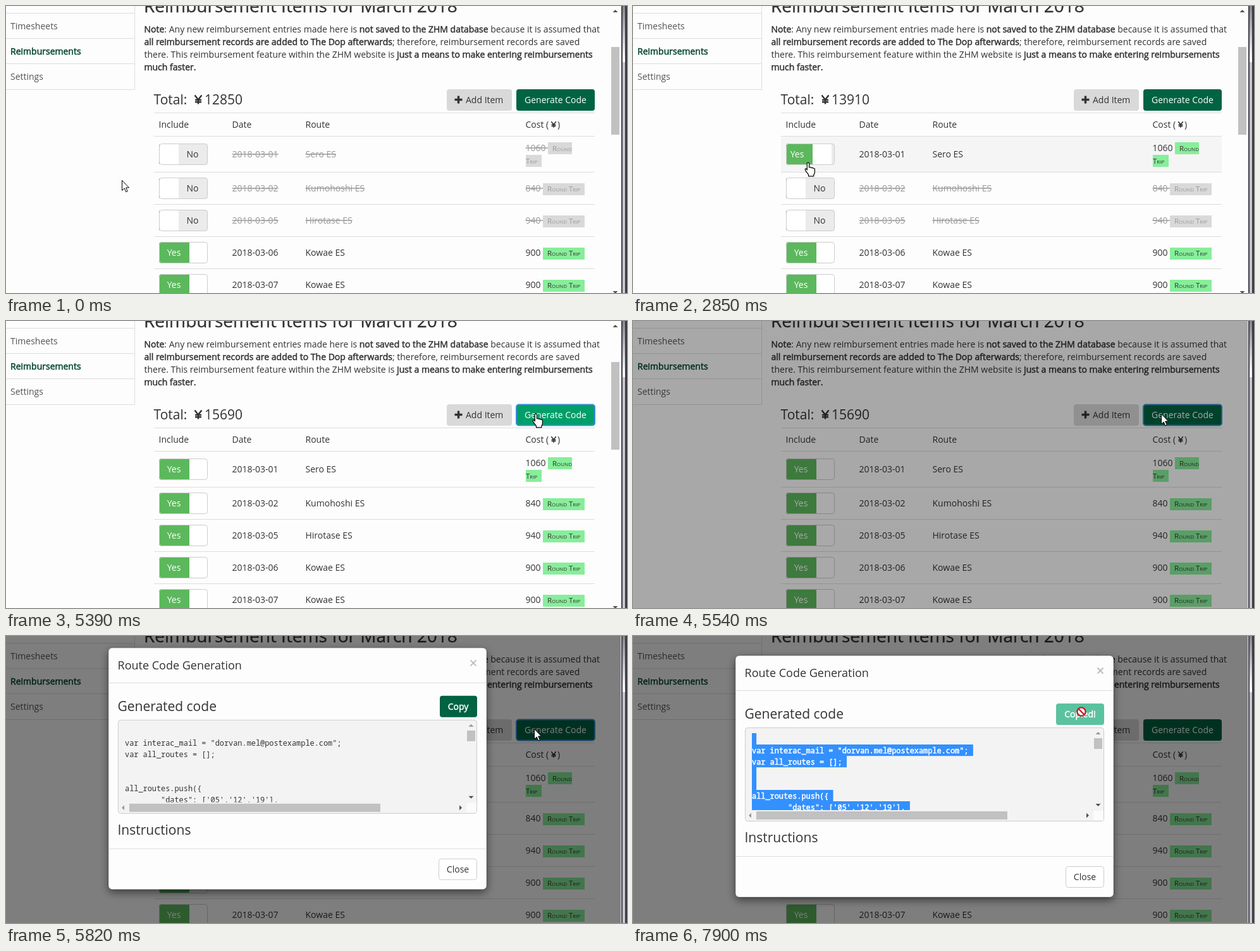
Write an HTML page that moves like this. It is 982 by 455 pixels and loops after 8000 ms.

```html
<!DOCTYPE html>
<html lang="en">
<head>
<meta charset="utf-8">
<title>Reimbursements</title>
<style>
  html, body { margin: 0; height: 100%; overflow: hidden; background: #fdfdfd; }
  svg { display: block; width: 982px; height: 455px; color: #333; }
  text { font: 14px "Open Sans", sans-serif; fill: currentColor; white-space: pre; }
  .bold { stroke: currentColor; stroke-width: .5px; }
  .head { font-size: 28px; stroke: currentColor; stroke-width: .35px; }
  .sub { font-size: 21px; }
  .badge { font-size: 11.4px; font-variant: small-caps; }
  .code { font: 11.9px "Noto Sans Mono", monospace; }
  .mid { text-anchor: middle; }
  .off { color: #999; }
  .off .strike { text-decoration: line-through; }
  .line { stroke: #ddd; }
  .tag { fill: #87ee9a; }
  .off .tag { fill: #d9d9d9; }
</style>
</head>
<body>
<svg id="stage" viewBox="0 0 982 455"></svg>
<script>
const LOOP = 8000;
const GREEN = '#006341', HOVER = '#009f69';
const CLICKS = [2560, 3400, 4280];
const OPEN = 5440, COPIED = 7000, BLOCKED = 7470;

const rows = [
  { y: 235, top: 207, bottom: 263, date: '2018-03-01', route: 'Sero ES', cost: 1060 },
  { y: 289, top: 264, bottom: 314, date: '2018-03-02', route: 'Kumohoshi ES', cost: 840 },
  { y: 340, top: 315, bottom: 365, date: '2018-03-05', route: 'Hirotase ES', cost: 940 },
  { y: 391, top: 366, bottom: 416, date: '2018-03-06', route: 'Kowae ES', cost: 900 },
  { y: 442, top: 417, bottom: 467, date: '2018-03-07', route: 'Kowae ES', cost: 900 },
];

// Pointer hot spot: [ms, x, y]
const pointerPath = [
  [0, 183, 276], [270, 183, 276], [410, 270, 334], [550, 278, 320], [860, 278, 320],
  [1140, 276, 218], [1450, 276, 218], [1730, 275, 220], [2020, 276, 220], [2300, 279, 270],
  [2560, 277, 248], [3000, 277, 248], [3130, 280, 280], [3850, 280, 280], [4000, 280, 332],
  [4800, 280, 332], [5230, 838, 147], [5390, 838, 147], [5540, 835, 147], [5900, 835, 147],
  [6370, 712, 113], [6500, 711, 115], [6770, 709, 119], [LOOP, 709, 119],
];

const text = (x, y, s, cls = '', extra = '') =>
  `<text x="${x}" y="${y}" class="${cls}" ${extra}>${s}</text>`;
const rect = (x, y, w, h, fill, extra = '') =>
  `<rect x="${x}" y="${y}" width="${w}" height="${h}" fill="${fill}" ${extra}/>`;
const hline = (x1, x2, y) => `<path class="line" d="M${x1} ${y + .5}H${x2}"/>`;
const bold = s => `<tspan class="bold">${s}</tspan>`;
const yen = (x, y, k) => `<path transform="translate(${x} ${y}) scale(${k})" fill="none"
  stroke="#333" stroke-width="2.4" d="M-5.5-7L0 0L5.5-7M0 0V7M-5 .5H5M-5 3.7H5"/>`;
const arrow = (x, y, dx, dy, fill = '#505050') => {
  const [px, py] = [dy, dx];
  return `<path fill="${fill}" d="M${x + dx * 3} ${y + dy * 3}L${x + px * 4 - dx} ${y + py * 4 - dy}L${x - px * 4 - dx} ${y - py * 4 - dy}z"/>`;
};

function sidebar() {
  return [11, 51, 91, 132].map(y => hline(0, 204, y)).join('') +
    '<path class="line" d="M203.5 0V132"/><g color="#555">' +
    text(7, 37, 'Timesheets') + text(7, 117, 'Settings') + '</g>' +
    text(7, 77, 'Reimbursements', 'bold', 'color="#00452d"');
}

function intro() {
  return text(218, 10, 'Reimbursement Items for March 2018', 'head') +
    text(218.5, 42, bold('Note') + ': Any new reimbursement entries made here is ' +
      bold('not saved to the ZHM database') + ' because it is assumed that') +
    text(218.5, 62, bold('all reimbursement records are added to The Dop afterwards') +
      '; therefore, reimbursement records are saved') +
    text(218.5, 82, 'there. This reimbursement feature within the ZHM website is ' +
      bold('just a means to make entering reimbursements')) +
    text(218.5, 102, 'much faster.', 'bold');
}

function toolbar() {
  return text(233.5, 156, 'Total:', 'sub') + yen(304, 148.5, 1) +
    text(314, 156, '', 'sub', 'id="total"') +
    rect(697, 132, 103, 34, '#d9d9d9', 'rx="4"') +
    '<path stroke="#333" stroke-width="3.4" d="M709.5 148.5h12M715.5 142.5v12"/>' +
    text(727, 154, 'Add Item') +
    rect(807, 132, 124, 34, GREEN, 'rx="4" id="generate"') +
    text(869, 154, 'Generate Code', 'mid', 'color="#fff"') +
    rect(807, 132.5, 124, 33, 'none', 'rx="4" stroke="#3d8fd6" stroke-width="2" id="ring"');
}

function tableRow({ y, top, bottom, date, route, cost }, i) {
  const toggle = `<g transform="translate(242 ${y - 17})" color="#333"><g clip-path="url(#pill)">
    ${rect(0, 0, 77, 34, '#fff')}<g id="slide${i}">${rect(0, 0, 48, 34, '#5cb85c')}
    ${text(23.5, 22, 'Yes', 'mid', 'color="#fff"')}${rect(78, 0, 48, 34, '#ebebeb')}
    ${text(100, 22, 'No', 'mid')}</g></g>${rect(.5, .5, 76, 33, 'none', 'rx="4" stroke="#ccc"')}</g>`;
  const price = i === 0
    ? text(821.5, 230, '1060 ', 'strike') + rect(857, 216, 38, 19, '', 'class="tag"') +
      rect(822, 236, 25, 19, '', 'class="tag"') +
      text(864, 230, 'Round', 'badge') + text(822, 250, 'Trip', 'badge')
    : text(821.5, y + 5, cost + ' ', 'strike') + rect(849, y - 8, 66, 19, '', 'class="tag"') +
      text(856, y + 5, 'Round Trip', 'badge');
  return rect(234, top, 697, bottom - top, '#f5f5f5', `id="hover${i}"`) +
    `<g id="row${i}">${toggle}${text(357.5, y + 5, date, 'strike')}` +
    `${text(473.5, y + 5, route, 'strike')}${price}</g>` + hline(234, 931, bottom);
}

function table() {
  return hline(234, 931, 169) + hline(234, 931, 206) +
    text(241.5, 193, 'Include') + text(357.5, 193, 'Date') + text(473.5, 193, 'Route') +
    text(821.5, 193, 'Cost (') + yen(866, 188, .68) + text(872, 193, ')') +
    rows.map(tableRow).join('');
}

function windowEdge() {
  return '<g id="scrollbar">' + rect(957, 65, 13, 139, '#c1c1c1') +
    arrow(963.5, 9, 0, -1) + arrow(963.5, 453, 0, 1) + '</g>';
}

function frameEdge() {
  return rect(972, 0, 1, 455, '#e4e4e6') + rect(973, 0, 2, 455, '#46434e') +
    rect(975, 0, 4, 89, 'url(#sheen)') + rect(975, 89, 4, 366, '#c6c5cb') +
    rect(979, 0, 3, 455, '#3c3945');
}

function codeBlock() {
  const lines = ['', 'var interac_mail = "dorvan.mel@postexample.com";', 'var all_routes = [];',
    '', '', 'all_routes.push({', '        "dates": [\'05\',\'12\',\'19\'],'];
  const marks = lines.map((s, i) =>
    rect(188, 154 + 18 * i, (s.length + 1) * 7.14, 18.2, '#3390ff')).join('');
  return rect(177.5, 145.5, 567, 148, '#f3f3f3', 'rx="4" stroke="#ccc"') +
    `<g clip-path="url(#codeView)"><g id="marks">${marks}</g><g id="code">` +
    lines.map((s, i) => text(188, 168 + 18 * i, s, 'code')).join('') + '</g></g>' +
    rect(728, 277, 16, 15, '#fbfbfb') + rect(729, 162, 13, 17, '#c1c1c1') +
    rect(195, 278, 397, 13, '#c1c1c1') +
    arrow(735.5, 155, 0, -1, '#999') + arrow(735.5, 267, 0, 1) +
    arrow(186, 284.5, -1, 0, '#999') + arrow(718, 284.5, 1, 0);
}

function modal() {
  return '<g id="modal">' +
    rect(162, 31, 598, 383, '#fdfdfd', 'rx="6" stroke="#000" stroke-opacity=".25" filter="url(#shadow)"') +
    text(176.5, 65, 'Route Code Generation', '', 'style="font-size:18px"') +
    '<path stroke="#bbb" stroke-width="1.8" d="M734.5 50.5l9 9m0-9l-9 9"/>' + hline(162, 760, 86) +
    text(176.5, 131, 'Generated code', 'sub') +
    rect(686, 107, 59, 34, GREEN, 'rx="4" id="copy"') +
    text(715, 129, 'Copy', 'mid bold', 'color="#fff" id="copyLabel"') +
    codeBlock() + text(176.5, 327, 'Instructions', 'sub') + hline(162, 760, 349) +
    rect(684.5, 365.5, 60, 33, '#fff', 'rx="4" stroke="#ccc"') + text(714.5, 387, 'Close', 'mid') + '</g>';
}

const pointers = `<g id="pointer" stroke-linejoin="round">
  <path id="arrow" fill="#fff" stroke="#000" d="M.5.5V16.5L4.2 13L6.8 18.8L9.2 17.7L6.7 12H11.5z"/>
  <path id="hand" fill="#fff" stroke="#000" stroke-width="1.2" d="M-1.7 12V1.7a1.6 1.6 0 0 1 3.2 0V8
    q2.8-1.2 3.3.6q2.6-.9 3 .8q2.6-.6 2.6 1.5v4.5q0 2-1.6 4v2.4h-8.3v-2.4l-4.6-6.3q-1.6-2.6.4-3.2q1.4 0 2 2.1z"/>
  <g id="blocked" fill="none"><circle cy="1" r="6.6" fill="#fff" stroke="#c0242c" stroke-width="2.4"/>
    <path stroke="#c0242c" stroke-width="2.4" d="M-4.5-3.5l9 9"/></g></g>`;

document.getElementById('stage').innerHTML = `<defs>
  <clipPath id="pill"><rect width="77" height="34" rx="4"/></clipPath>
  <clipPath id="codeView"><rect x="178" y="146" width="550" height="130"/><rect x="178" y="146" width="566" height="130"/></clipPath>
  <linearGradient id="sheen" x2="0" y2="1"><stop stop-color="#85848b"/><stop offset="1" stop-color="#fff"/></linearGradient>
  <filter id="shadow" x="-10%" y="-10%" width="120%" height="125%">
    <feDropShadow dx="0" dy="5" stdDeviation="7" flood-opacity=".5"/></filter></defs>` +
  rect(0, 0, 982, 455, '#fdfdfd') + sidebar() + intro() + toolbar() + table() + windowEdge() +
  rect(0, 0, 972, 455, '#000', 'id="backdrop"') + frameEdge() + modal() + pointers;

const el = id => document.getElementById(id);
const set = (id, name, value) => el(id).setAttribute(name, value);
const show = (id, on) => set(id, 'visibility', on ? 'visible' : 'hidden');
const clamp = p => Math.min(1, Math.max(0, p));
const inBox = (x, y, [l, t, r, b]) => x >= l && x <= r && y >= t && y <= b;

function bezier(p, x1, y1, x2, y2) {
  const at = (s, a, b) => 3 * (1 - s) ** 2 * s * a + 3 * (1 - s) * s * s * b + s ** 3;
  let lo = 0, hi = 1;
  for (let i = 0; i < 20; i++) {
    const s = (lo + hi) / 2;
    if (at(s, x1, x2) < p) lo = s; else hi = s;
  }
  return at(lo, y1, y2);
}

function pointerAt(t) {
  const i = pointerPath.findIndex(k => k[0] > t);
  const [t0, x0, y0] = pointerPath[i - 1], [t1, x1, y1] = pointerPath[i];
  const p = (t - t0) / (t1 - t0);
  return [x0 + (x1 - x0) * p, y0 + (y1 - y0) * p];
}

function render(t) {
  const [x, y] = pointerAt(t), opened = t >= OPEN, copied = t >= COPIED;
  const overGenerate = !opened && inBox(x, y, [807, 132, 931, 166]);
  const overCopy = opened && inBox(x, y, [686, 107, 745, 141]);
  const overToggle = !opened && rows.some(r => inBox(x, y, [242, r.y - 17, 319, r.y + 17]));
  const overAdd = !opened && inBox(x, y, [697, 132, 800, 166]);

  let total = 12850;
  rows.forEach((row, i) => {
    const start = CLICKS[i] ?? -LOOP, on = t >= start;
    if (on && i < CLICKS.length) total += row.cost;
    const p = bezier(clamp((t - start) / 500), .25, .1, .25, 1);
    set('slide' + i, 'transform', `translate(${-47 * (1 - p)} 0)`);
    set('row' + i, 'class', on ? '' : 'off');
    show('hover' + i, !opened && inBox(x, y, [234, row.top, 931, row.bottom]));
  });
  el('total').textContent = total;

  set('generate', 'fill', overGenerate ? HOVER : GREEN);
  show('ring', t >= 5380 && !copied);
  show('scrollbar', !opened);
  set('backdrop', 'opacity', .5 * clamp((t - OPEN) / 150));

  const since = t - 5610;
  set('modal', 'opacity', clamp(since / 150));
  set('modal', 'transform', `translate(0 ${-96 * (1 - bezier(clamp(since / 300), 0, 0, .58, 1))})`);
  set('copy', 'x', copied ? 669 : 686);
  set('copy', 'width', copied ? 76 : 59);
  set('copy', 'fill', copied ? '#5bc2a0' : overCopy ? HOVER : GREEN);
  set('copyLabel', 'x', copied ? 707 : 715);
  el('copyLabel').textContent = copied ? 'Copied!' : 'Copy';
  show('marks', copied);
  set('code', 'color', copied ? '#fff' : '#333');
  set('code', 'class', copied ? 'bold' : '');

  const blocked = t >= BLOCKED;
  const hand = !blocked && (overGenerate || overCopy || overToggle || overAdd);
  set('pointer', 'transform', `translate(${x} ${y})`);
  show('blocked', blocked);
  show('hand', hand);
  show('arrow', !hand && !blocked);
}

function tick() {
  render(performance.now() % LOOP);
  requestAnimationFrame(tick);
}
tick();
</script>
</body>
</html>
```
